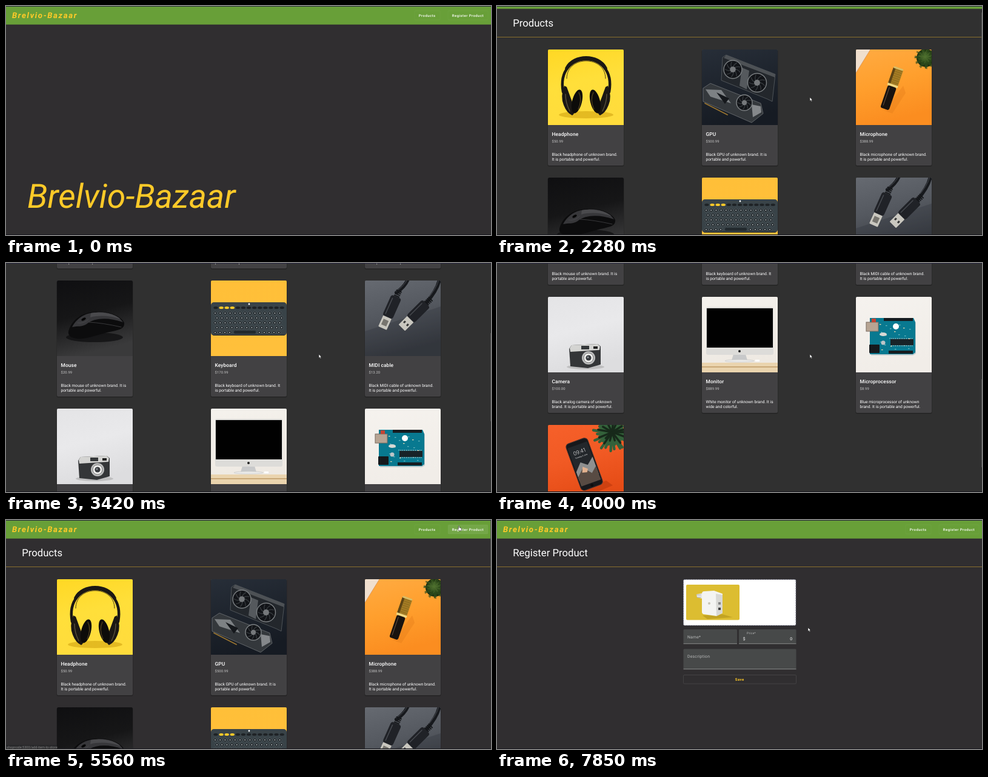
Write an HTML page that moves like this. It is 800 px wide and 379 px high and loops after 8000 ms.

```html
<!DOCTYPE html>
<html lang="en">
<head>
<meta charset="utf-8">
<title>Shop demo</title>
<style>
  html, body { margin: 0; width: 100%; height: 100%; overflow: hidden; background: #303030; }
  svg { display: block; }
  #stage { width: 800px; height: 379px; }
  text { font-family: Roboto, "Liberation Sans", sans-serif; text-rendering: geometricPrecision; }
</style>
</head>
<body>
<svg id="stage" viewBox="0 0 800 379" fill="#fff"></svg>
<script>
const BRAND = 'Brelvio-Bazaar', HOST = 'shopnode:5300/';
const AMBER = '#ffca28';

// Markup helpers
const text = (x, y, size, str, attrs = '') => `<text x="${x}" y="${y}" font-size="${size}" ${attrs}>${str}</text>`;
const rect = (x, y, w, h, fill, attrs = '') => `<rect x="${x}" y="${y}" width="${w}" height="${h}" fill="${fill}" ${attrs}/>`;
const oval = (x, y, rx, ry, fill, attrs = '') => `<ellipse cx="${x}" cy="${y}" rx="${rx}" ry="${ry}" fill="${fill}" ${attrs}/>`;
const disc = (x, y, r, fill, attrs) => oval(x, y, r, r, fill, attrs);
const path = (d, fill, attrs = '') => `<path d="${d}" fill="${fill}" ${attrs}/>`;
const line = (d, color, width) => path(d, 'none', `stroke="${color}" stroke-width="${width}" stroke-linecap="round"`);
const group = (transform, body) => `<g transform="${transform}">${body}</g>`;
const repeat = (n, fn) => Array.from({ length: n }, (_, i) => fn(i)).join('');

let gradients = '<clipPath id="round"><path d="M0 125V2Q0 0 2 0H123Q125 0 125 2V125Z"/></clipPath>';
function gradient(id, ...colors) {
  gradients += `<linearGradient id="${id}" x2=".25" y2="1">` +
    colors.map((c, i) => `<stop offset="${i / (colors.length - 1)}" stop-color="${c}"/>`).join('') + '</linearGradient>';
  return rect(0, 0, 125, 125, `url(#${id})`);
}

const leaves = (x, y, n, r, color, width = r / 7) => repeat(n, i => {
  const a = i * 2.4, l = r * (.8 + .2 * Math.sin(i * 5));
  return line(`M${x} ${y}l${(Math.cos(a) * l).toFixed(1)} ${(Math.sin(a) * l).toFixed(1)}`, color, width);
});

// Product pictures, each 125 by 125
function headphone() {
  const cup = path('M27 60Q20 78 26 92Q31 105 40 109Q46 106 42 92Q36 76 31 62Z', '#1b1814') +
    oval(48, 86, 8, 20, '#0d0c0a', 'transform="rotate(14 48 86)"') +
    line('M29 74Q29 88 36 102', '#5a513d', 1.4) + line('M51 71Q57 83 50 99', '#5c4a20', 1.1);
  return gradient('hp', '#ffd824', '#ffdf3a', '#ffdc3c') + oval(63, 108, 45, 6, '#c99a08', 'opacity=".5"') +
    line('M25 70C12 -2 114 -2 101 70', '#1a1714', 4.5) + line('M31 31C43 8 83 8 95 31', '#1a1714', 5.5) +
    line('M31 48C31 9 95 9 95 48', '#4a3c16', 1) +
    cup + group('translate(126) scale(-1 1)', cup);
}

function gpu() {
  const blade = (x, y, r, turn) => group(`rotate(${turn} ${x} ${y})`,
    line(`M${x} ${y}q${r * .5} ${-r * .1} ${r * .78} ${r * .3}`, '#34383c', 1.4));
  const fan = (x, y, r) => disc(x, y, r, '#121418', 'stroke="#7c8083" stroke-width="1.4"') +
    repeat(9, i => blade(x, y, r, i * 40)) + disc(x, y, r * .32, '#75787b');
  return gradient('gp', '#272e38', '#1e242d', '#161b23') +
    path('M34 13L40 9L121 41L116 86L108 82L32 51Z', '#23272c', 'stroke="#5b6064" stroke-width=".8"') +
    path('M40 9L121 41L120 46L36 14Z', '#4d5155') + path('M66 30L78 35L74 66L62 60Z', '#55595d') +
    fan(51, 33, 15) + fan(91, 55, 15.5) +
    path('M2 64L14 56L97 89L101 106L82 121L2 86Z', '#34383c', 'stroke="#6f7376" stroke-width=".8"') +
    path('M6 66L32 67L48 89L14 78Z', '#7d8184') + path('M24 71L45 81L38 90Z', '#15181c') +
    path('M82 91L97 94L98 104L84 112Z', '#85888b') + fan(70, 88, 13) + line('M5 89L42 108', '#9a7530', 1.8);
}

function microphone() {
  const mic = rect(-8.5, -38, 17, 32, '#a47c24', 'rx="3"') + repeat(8, i => line(`M-8 ${-35 + i * 3.6}h15`, '#80601c', .7)) +
    rect(-8.5, -38, 4, 32, '#5d4414', 'rx="2"') + rect(-9, -10, 18, 4, '#f1d780', 'rx="1"') +
    rect(-8.5, -39, 17, 3, '#d9bd66', 'rx="1.5"') +
    rect(-7.5, -6, 15, 39, '#19130f', 'rx="3"') + line('M-4 -3V28', '#5d4a3c', 1.2);
  return gradient('mi', '#ffab42', '#ff9f2d', '#fb8d20') + path('M0 0H24L0 39Z', '#f0dfce') +
    line('M24 0L0 39', '#d88c4a', .8) + disc(115, 14, 15, '#1f3212') + leaves(115, 14, 90, 18, '#2d4a1b', 1) +
    leaves(114, 12, 40, 11, '#4f7030', .7) +
    path('M47 101L78 60L82 72L60 106Z', '#e07a18', 'opacity=".35"') + group('translate(58 67) rotate(19)', mic);
}

function mouse() {
  return gradient('mo', '#0f0f11', '#161617', '#3a3a3b') + oval(62, 94, 47, 8, '#0c0c0d', 'opacity=".7"') +
    path('M19 84C24 66 40 53 62 52C84 49 107 59 111 70C112 79 105 81 92 84C70 88 46 99 32 96C22 94 18 91 19 84Z', '#0c0c0d') +
    path('M25 77C35 59 50 53 65 53C87 50 104 61 109 69C85 61 63 61 49 72C42 77 34 75 25 77Z', '#37373a') +
    path('M56 54C75 50 98 56 105 64C88 58 70 57 55 61Z', '#4a4a4d') +
    line('M34 70Q45 72 52 64M53 69Q75 70 106 77', '#4c4c4f', .7) + oval(44, 64, 4, 2, '#050505', 'transform="rotate(-30 44 64)"');
}

function keyboard() {
  const key = (x, y, w = 3.2) => oval(x, y, w, 3.1, '#22292d', 'stroke="#687175" stroke-width=".5"') +
    disc(x, y, .9, '#c0c5c7');
  return gradient('kb', '#ffbf38', '#ffc03b') + rect(0, 36, 125, 55, '#394348', 'rx="5"') + line('M4 90.5H121', '#1c2022', 1) +
    disc(63, 39, 1.4, '#fff') +
    repeat(13, i => oval(8 + i * 9.1, 45, 3.7, 2, i && i < 4 ? AMBER : '#1e2225')) +
    repeat(4, r => repeat(14, i => key(7 + (r % 2) * 3 + i * 8.2, 54 + r * 8))) +
    repeat(4, i => key(7 + i * 8, 86)) + rect(38, 83, 36, 5, '#22292d', 'rx="2"') + repeat(5, i => key(80 + i * 8, 86));
}

function cable() {
  const plug = rect(-9, -20, 18, 37, '#202227', 'rx="4"') + line('M-5 -15V13', '#4d5056', 1.3) +
    repeat(4, i => line(`M-4 ${-30 + i * 3}h8`, '#15171a', 2)) + rect(-7.5, 17, 15, 20, '#c9c7bf', 'rx="1"');
  return gradient('cb', '#666a71', '#54585f', '#373a40') + path('M0 84L125 43V125H0Z', '#272a30', 'opacity=".25"') +
    line('M71 -2Q66 10 52 20M123 -2Q120 15 101 37', '#17191d', 6) + line('M70 -2Q65 9 51 18M122 -2Q119 13 100 34', '#484b51', 1) +
    group('translate(44 45) rotate(24)', plug + rect(-4.5, 22, 9, 10, '#77756f')) +
    group('translate(87 52) rotate(45)', plug + rect(-5, 25, 3, 4, '#333') + rect(2, 25, 3, 4, '#333'));
}

function camera() {
  return gradient('ca', '#e4e4e6', '#e9e9eb', '#dddddf') + oval(62, 116, 31, 4, '#aaa', 'opacity=".6"') +
    path('M35 86L39 80L82 78L87 82V112L66 118L37 115Z', '#343638') + path('M36 85L39 80L82 78L86 82L85 88L37 91Z', '#d4d4d2') +
    rect(55, 81, 13, 6, '#35383a') + rect(75, 82, 7, 4, '#222') + disc(67, 101, 11, '#bcbdbd') +
    disc(67, 101, 8, '#eeeeec', 'stroke="#777"') + disc(67, 101, 4.6, '#373a3e') + disc(66, 100, 1.5, '#91979d');
}

function monitor() {
  return gradient('mn', '#f5f2ed', '#eee9e2') + rect(0, 109, 125, 16, '#ead4ae') + rect(0, 115, 125, 2, '#c9a878') +
    path('M52 95H72L75 105H49Z', '#c8c9ca') + oval(62, 106, 24, 2.2, '#e9e9e8', 'stroke="#bbb" stroke-width=".5"') +
    rect(7, 17, 111, 79, '#dddcd9', 'rx="3"') + rect(8, 19, 109, 65, '#010101') + disc(62, 90, 2, '#222') +
    rect(88, 104, 7, 3, '#fff');
}

function processor() {
  return gradient('pr', '#f5f2ee', '#f1ede8') + path('M25 36H95L99 43V94L94 97H25Z', '#9aaeb5', 'opacity=".5"') +
    path('M23 35H95L98 42V92L94 95H23Z', '#087990') +
    repeat(22, i => rect(39 + i * 31 % 54, 45 + i * 17 % 45, 2.5, 1.3, i % 3 ? '#6bb4bd' : '#e0d8ae')) +
    rect(17, 42, 20, 15, '#b7a493', 'stroke="#786b61"') + rect(22, 79, 17, 14, '#15191d', 'rx="1"') +
    rect(46, 35, 48, 5, '#161c20') + rect(54, 89, 40, 5, '#161c20') +
    repeat(12, i => rect(59 + i * 3, 68, 1, 14, '#b0b9b9')) + rect(57, 70, 38, 10, '#182328') +
    disc(66, 49, 5, '#fff') + rect(26, 36, 7, 6, '#c34534') + oval(45, 62, 6, 3, '#d8d9d5') + disc(45, 76, 3.5, '#bdc5c8');
}

function phone() {
  const body = rect(-19, -41, 38, 82, '#17181b', 'rx="6" stroke="#4a3430"') + rect(-17, -34, 34, 67, '#23272b') +
    path('M-17 8L-5 -5L5 3L17 -7V24H-17Z', '#8e9090') + path('M-17 17L-4 5L7 18L17 9V33H-17Z', '#584b43') +
    path('M-8 12L-4 3L3 9L0 14Z', '#e2b18e') + text(0, -19, 9, '09:41', 'text-anchor="middle" font-weight="300"') +
    text(0, -13, 3, 'Tuesday, 4 June', 'text-anchor="middle"') + disc(0, 37, 2.4, '#0b0c0e');
  return gradient('ph', '#f6602a', '#f15a24', '#e54c16') + path('M60 109L96 92L107 100L70 116Z', '#b5340a', 'opacity=".5"') +
    disc(106, 12, 17, '#1d3320') + leaves(105, 14, 34, 31, '#33613a') + leaves(106, 12, 15, 24, '#17291a') +
    group('translate(60 65) rotate(-20)', body);
}

const products = [
  [headphone, 'Headphone', '50.99', 'Black headphone of unknown brand.', 'It is portable and powerful.'],
  [gpu, 'GPU', '500.99', 'Black GPU of unknown brand. It is', 'portable and powerful.'],
  [microphone, 'Microphone', '388.99', 'Black microphone of unknown brand.', 'It is portable and powerful.'],
  [mouse, 'Mouse', '20.99', 'Black mouse of unknown brand. It is', 'portable and powerful.'],
  [keyboard, 'Keyboard', '170.99', 'Black keyboard of unknown brand. It', 'is portable and powerful.'],
  [cable, 'MIDI cable', '13.20', 'Black MIDI cable of unknown brand.', 'It is portable and powerful.'],
  [camera, 'Camera', '100.00', 'Black analog camera of unknown', 'brand. It is portable and powerful.'],
  [monitor, 'Monitor', '889.99', 'White monitor of unknown brand. It is', 'wide and colorful.'],
  [processor, 'Microprocessor', '8.99', 'Blue microprocessor of unknown', 'brand. It is portable and powerful.'],
  [phone, 'Smartphone', '599.99', 'Black smartphone of unknown', 'brand. It is portable and powerful.'],
];

const card = ([draw, name, price, ...lines], i) => group(`translate(${84 + i % 3 * 254} ${98 + Math.floor(i / 3) * 212})`,
  rect(-.5, 1, 126, 192.5, '#000', 'rx="2" opacity=".25"') + rect(0, 0, 125, 192, '#424143', 'rx="2"') +
  `<g clip-path="url(#round)">${draw()}</g>` +
  text(6.5, 143.2, 8.4, name, 'font-weight="500" letter-spacing=".08"') + text(6.5, 154.2, 5.9, '$' + price, 'fill="#c6c6c6" letter-spacing=".1"') +
  lines.map((s, k) => text(6.5, 175.7 + k * 8, 6.7, s)).join(''));

const navButton = (id, x, w, label) => rect(x, 8, w, 15, '#fff', `id="${id}" rx="1.5" fill-opacity="0" stroke="#fff" stroke-opacity=".07" stroke-width=".6"`) +
  text(x + 6.8, 17.7, 5.9, label, 'font-weight="500" letter-spacing=".5"');
const header = rect(0, 0, 800, 30.7, '#689f38') +
  text(10, 20, 13.2, BRAND, `font-weight="700" font-style="italic" letter-spacing="1.65" fill="${AMBER}"`) +
  navButton('navProducts', 674, 42, 'Products') + navButton('navRegister', 729, 66, 'Register Product');
const heading = str => text(26.2, 60, 16.7, str);

const field = (x, y, w, h) => rect(x, y, w, h, '#474949', 'rx="1.5"') + rect(x, y + h - .6, w, .8, '#9b9c9c');
const label = (x, y, size, str) => text(x, y, size, str, 'fill="#b9baba" letter-spacing=".25"');
const preview = rect(312, 107, 88, 58.5, '#dcbd31', 'rx="2"') + path('M339 158L372 156L389 161L347 164Z', '#a98a16', 'opacity=".5"') +
  path('M329 123L340 121V132L338 130L330 128Z', '#e8e8e6') + line('M329 124h7M330 128h6', '#aaa', 1) +
  path('M338 122Q338 118 342 118L358 117L372 122V154L362 159L341 156Q338 155 338 152Z', '#f4f4f2') +
  path('M361 122L372 124V154L362 159Z', '#d8d8d5') + disc(350, 138, 2, '#c8c5b4') +
  rect(365, 136, 4, 4, '#888') + rect(365, 145, 4, 4, '#444');
const form = heading('Register Product') +
  rect(307.5, 98.5, 185.5, 76, '#fff', 'rx="2" stroke="#717386" stroke-dasharray="2.4 1.6"') +
  `<g id="preview">${preview}</g>` +
  field(307.5, 181, 88.5, 24) + label(314, 195.7, 6.8, 'Name*') +
  field(399, 181, 94.5, 24) + label(412, 189.4, 5, 'Price*') + text(405.8, 199.2, 6.8, '$') + text(487, 199.2, 6.8, '0', 'text-anchor="end"') +
  field(307.5, 213.5, 186, 33.5) + label(314, 228, 6.8, 'Description') +
  rect(307.5, 256.5, 186, 14.5, 'none', 'rx="1.5" stroke="#49484a" stroke-width=".8"') +
  text(400.3, 265.8, 6, 'Save', `text-anchor="middle" font-weight="700" letter-spacing=".5" fill="${AMBER}"`);

const list = products.map(card).join('');
const stage = document.getElementById('stage');
stage.innerHTML = `<defs>${gradients}</defs>` + rect(0, 0, 800, 379, '#302f30', 'id="back"') +
  `<g id="page">${header}${rect(0, 77, 800, 1, '#8a6f2e', 'id="divider"')}
    <g id="home">${text(35, 334, 55.4, BRAND, `font-style="italic" fill="${AMBER}"`)}</g>
    <g id="shop">${heading('Products')}${list}</g><g id="form">${form}</g></g>` +
  rect(799, 0, 1, 146, '#555', 'id="thumb"') +
  rect(0, 0, 800, 1, '#26263c') + rect(0, 378, 800, 1, '#17171d') +
  `<g id="status">${rect(0, 372, 84, 7, '#29292b')}${text(1, 377.6, 5.6, '', 'id="link" fill="#858585"')}</g>` +
  `<g id="cursor" stroke="#222" stroke-width=".6">
    <path id="arrow" d="M0 0V6.2L1.5 4.9L2.6 7.2L3.7 6.6L2.7 4.5H4.5Z"/>
    <path id="hand" d="M-.6 -3Q.2 -4 1 -3V-.3L3.8 .3Q4.6 .6 4.4 2L3.8 4.8H.2L-2.4 1.6Q-2 .6 -.6 1.6Z"/></g>`;

// Keys: [tick, value...], linear in between
const scrollKeys = [[15, 0], [16, 26], [21, 143], [28, 466], [30, 565], [31, 565], [33, 328], [34, 228], [36, 20], [37, 0]];
const cursorKeys = [[1, 766, 330], [4, 740, 120], [7, 697, 14], [12, 697, 14], [15, 516, 151], [36, 516, 151], [39, 747, 13],
  [41, 747, 13], [43, 617, 59], [44, 617, 59], [47, 420, 140], [50, 420, 140], [52, 570, 300], [55, 513, 178]];

function at(keys, n) {
  const i = keys.findIndex(k => k[0] > n);
  if (i === 0) return keys[0].slice(1);
  if (i < 0) return keys[keys.length - 1].slice(1);
  const a = keys[i - 1], b = keys[i], p = (n - a[0]) / (b[0] - a[0]);
  return a.slice(1).map((v, k) => v + (b[k + 1] - v) * p);
}

const el = id => document.getElementById(id);
const show = (id, on) => el(id).setAttribute('display', on ? 'inline' : 'none');
const set = (id, name, value) => el(id).setAttribute(name, value);

function render(n) {
  const shop = n >= 11 && n < 41, form = n >= 41;
  const [scroll] = at(scrollKeys, n), [x, y] = at(cursorKeys, n);
  const onProducts = n >= 7 && n <= 12, onRegister = n >= 39 && n <= 41, hover = onProducts || onRegister;
  show('home', n < 11);
  show('shop', shop);
  show('form', form);
  show('divider', n >= 11);
  show('preview', n >= 54);
  show('thumb', shop);
  show('status', hover);
  show('cursor', n > 0);
  show('arrow', !hover);
  show('hand', hover);
  set('back', 'fill', n >= 12 && n < 35 ? '#303030' : '#302e30');
  set('page', 'transform', `translate(0 ${-Math.round(scroll)})`);
  set('thumb', 'y', scroll * .412);
  set('cursor', 'transform', `translate(${x} ${y})`);
  set('navProducts', 'fill-opacity', onProducts ? .08 : 0);
  set('navRegister', 'fill-opacity', onRegister ? .08 : 0);
  el('link').textContent = HOST + (onProducts ? 'items' : 'add-item-to-store');
}

const start = performance.now();
function frame() {
  const t = (performance.now() - start) % 8000;
  render(Math.min(55, Math.floor((t + 12) * 7 / 1000)));
  requestAnimationFrame(frame);
}
frame();
</script>
</body>
</html>
```
